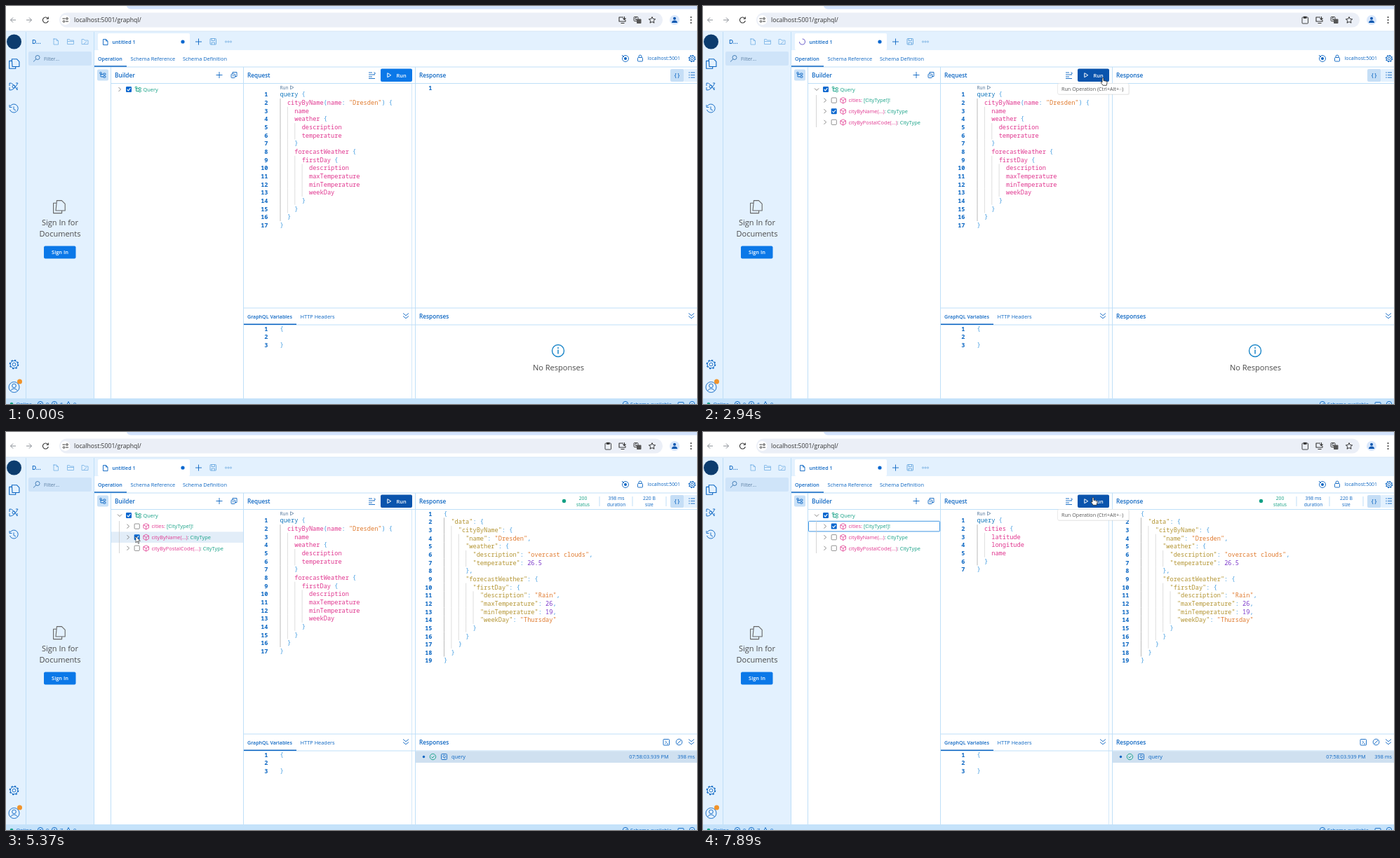
Write an HTML page that moves like this. It is 985x568 px and loops after 8000 ms.

```html
<!DOCTYPE html>
<html lang="en">
<head>
<meta charset="utf-8">
<title>GraphQL editor</title>
<style>
html, body { margin: 0; width: 100%; height: 100%; overflow: hidden; background: #fff }
svg { display: block; font-family: "Open Sans", "Noto Sans", sans-serif }
.mono { font-family: "Noto Sans Mono", "DejaVu Sans Mono", monospace; font-size: 8.65px; font-weight: 500 }
.num { font-weight: 700; fill: #0a66c2 }
</style>
</head>
<body>
<svg width="985" height="568" viewBox="0 0 985 568"><g id="base"></g><g id="live"></g></svg>
<script>
const BLUE = '#0b65c2', RUN = '#0b78e8', DARK = '#0a54ad', PALE = '#e3f1fe', EDGE = '#bfdff8',
  PINK = '#e0368f', GREEN = '#14a085', GREY = '#4a4a4a', LOOP = 8000, LINE = 11.66, CHAR = 5.19;

// Shape helpers; text is placed by its visual middle.
const rect = (x, y, w, h, fill, extra = '') => `<rect x="${x}" y="${y}" width="${w}" height="${h}" fill="${fill}" ${extra}/>`;
const path = (d, stroke = BLUE, width = 0.9, fill = 'none', extra = '') =>
  `<path d="${d}" stroke="${stroke}" stroke-width="${width}" fill="${fill}" stroke-linejoin="round" ${extra}/>`;
const circle = (x, y, r, fill, stroke = 'none', width = 0.9) =>
  `<circle cx="${x}" cy="${y}" r="${r}" fill="${fill}" stroke="${stroke}" stroke-width="${width}"/>`;
const ring = (x, y, r, stroke = BLUE, width = 0.9) => circle(x, y, r, 'none', stroke, width);
const box = (x, y, w, h, stroke = BLUE, r = 1) => rect(x, y, w, h, 'none', `stroke="${stroke}" stroke-width=".9" rx="${r}"`);
const text = (x, y, s, size = 7.4, fill = BLUE, weight = 400, anchor = 'start') =>
  `<text x="${x}" y="${y + size * 0.36}" font-size="${size}" fill="${fill}" font-weight="${weight}" text-anchor="${anchor}">${s}</text>`;
const bold = (x, y, s, size, fill, anchor) => text(x, y, s, size, fill, 600, anchor);
const hline = (x1, x2, y, color = EDGE, w = 1) => path(`M${x1} ${y}H${x2}`, color, w);
const vline = (x, y1, y2, color = EDGE, w = 1) => path(`M${x} ${y1}V${y2}`, color, w);

const files = (x, y, s, color) => path(`M${x - 3 * s} ${y - 7 * s}h7l${4 * s} ${4 * s}v${8 * s}h${-11 * s}z
  M${x - 3 * s} ${y - 4 * s}h${-4 * s}v${12 * s}h${10 * s}v${-3 * s}`, color, 1.1);
const page = (x, y, color = BLUE) => path(`M${x - 3} ${y - 4}h4l2.5 2.5v5.5h-6.5zM${x + 1} ${y - 4}v2.5h2.5`, color);
const gear = (x, y, r) => ring(x, y, r * 0.36) + ring(x, y, r * 0.8) +
  circle(x, y, r * 0.95, 'none', BLUE, 1.3).replace('/>', ` stroke-dasharray="${r * 0.37}"/>`);
const cube = (x, y) => path(`M${x} ${y - 4}l3.8 2v4.2l-3.8 2.2l-3.8-2.2v-4.2zM${x - 3.8} ${y - 2}l3.8 2l3.8-2M${x} ${y}v4.2`, PINK, 0.8);
const branch = (x, y, color) => path(`M${x - 3} ${y - 2}v4.5h3.5M${x - 3} ${y - 1}h3.5`, color) +
  box(x - 4.3, y - 4, 2.6, 2.3, color) + box(x + 0.5, y - 2.5, 3.5, 2.3, color) + box(x + 0.5, y + 1.3, 3.5, 2.3, color);
const fold = (x, y) => path(`M${x - 4} ${y - 4}l4 3.3l4-3.3M${x - 4} ${y}l4 3.3l4-3.3`);
const checkbox = (x, y, on) => on
  ? rect(x - 4, y - 4, 8, 8, '#0867cf', 'rx="1.2"') + path(`M${x - 2.3} ${y}l1.7 1.8l3-3.6`, '#fff', 1.1)
  : rect(x - 3.6, y - 3.6, 7.2, 7.2, '#fff', 'stroke="#777" stroke-width=".8" rx="1"');
const chevron = (x, y, open) => path(open ? `M${x - 3} ${y - 1.5}l3 3l3-3` : `M${x - 1.5} ${y - 3}l3 3l-3 3`, '#777');

// Code listings
const KINDS = ['#b39431', '#e07a2e', '#7a35c9', '#1478bd', PINK, '#3f9be0'];
const highlight = line => line.replace(/("[^"]*")(?=:)|("[^"]*")|(\d[\d.]*)|(\bquery\b)|(\w+)|([{}(),:]+)/g,
  (s, ...groups) => `<tspan fill="${KINDS[groups.slice(0, 6).findIndex(Boolean)]}">${s}</tspan>`);
function code(lines, x, y, numRight, guides = true) {
  return lines.map((line, i) => {
    const indent = line.search(/\S|$/), cy = y + i * LINE;
    let out = `<text class="mono num" x="${numRight}" y="${cy + 3.1}" text-anchor="end">${i + 1}</text>
      <text class="mono" x="${x + indent * CHAR}" y="${cy + 3.1}">${highlight(line.trim())}</text>`;
    if (guides) for (let c = 0; c < indent; c += 2)
      out += vline(x + c * CHAR + 0.5, cy - LINE / 2, cy + LINE / 2, c ? '#d6d6d6' : '#aaa', 0.8);
    return out;
  }).join('');
}
const FULL = `query {
  cityByName(name: "Dresden") {
    name
    weather {
      description
      temperature
    }
    forecastWeather {
      firstDay {
        description
        maxTemperature
        minTemperature
        weekDay
      }
    }
  }
}`.split('\n');
const EMPTY = ['query {', '', '}'];
const CITIES = ['query {', '  cities {', '    latitude', '    longitude', '    name', '  }', '}'];
const RESULT = JSON.stringify({ data: { cityByName: {
  name: 'Dresden',
  weather: { description: 'overcast clouds', temperature: 26.5 },
  forecastWeather: { firstDay: { description: 'Rain', maxTemperature: 26, minTemperature: 19, weekDay: 'Thursday' } }
} } }, null, 2).split('\n');

function browserBar() {
  return rect(0, 0, 985, 36, '#fff') + path('M172 0q1 4 6 4.5H985V0z', 'none', 0, '#d3e3fd') +
    path('M14 20H6.5m3.5-3.5l-3.5 3.5l3.5 3.5M29 20h7.500m-3.500-3.500l3.500 3.500l-3.500 3.500', '#8a8f96', 1) +
    path('M59.500 17.500a4 4 0 1 0 .8 3.500M60.300 15.500v2.700h-2.700', '#333', 1.100) +
    rect(76, 9.5, 860, 21, '#ebeff7', 'rx="10.5"') + circle(84.5, 20, 7, '#fff') +
    path('M80.500 18h4M85 22h4', '#333', 1) + ring(87, 18, 1.3, '#333') + ring(82.5, 22, 1.3, '#333') +
    text(97, 20, 'localhost:5001/graphql/', 8.66, '#333') +
    path('M880 16h-6v6h9v-2M876.500 24.500h5M881.500 15v4.500m-2-2l2 2l2-2', '#333', 1.100) +
    box(895, 15.5, 6, 6, '#333') + rect(899, 18.5, 6.5, 6.5, '#555', 'rx="1"') + text(898, 18.5, 'G', 4.5, '#333', 700, 'middle') +
    path('M921 15.500l1.400 3l3.300.3l-2.500 2.200l.8 3.200l-3-1.700l-3 1.700l.8-3.200l-2.500-2.200l3.300-.3z', '#333', 1) +
    circle(953, 20, 7, '#d9e7fb') + circle(953, 17.8, 2, '#0b57b0') + path('M949 24q0-3.500 4-3.500t4 3.500z', 'none', 0, '#0b57b0') +
    [16, 20, 24].map(y => circle(976.5, y, 1, '#333')).join('');
}
function sidebar() {
  return rect(0, 36, 985, 27, PALE) + rect(0, 36, 126, 524, PALE) + hline(0, 985, 36, '#d5e6f6') +
    vline(28.5, 37, 560) + vline(125.5, 37, 560) +
    circle(11.5, 51, 10.5, '#0c3c6e') + files(11, 82, 0.9, BLUE) +
    ring(11, 115, 2) + path('M5 110q5-1 11 10M5 120q6 1 12-10M5 110v4M5 120v-4M17 110l-3 0M16 120v-4') +
    path('M6 143a6 6 0 1 1-.5 5M5 141v3.500h3.500M11 143.500v4l3 1.500') +
    gear(11.5, 511.5, 6.5) +
    ring(11.5, 544, 7.5) + ring(11.5, 542, 2.8) + path('M6.500 549q5-6 10 0') + circle(19.5, 536, 3.5, '#f0932b') +
    bold(37, 51, 'D...', 8.4) +
    page(71, 51, '#82b8e8') + path('M67 47h3', '#82b8e8') +
    path('M87.500 54.500v-7h3l1 1.500h5v5.500zM87.500 50.500h9M108 54.500v-7h3l1 1.500h5v5.500zM111 54l4-3.500', '#82b8e8') +
    rect(32, 65, 90, 20, '#cfe4f9', 'rx="2"') + ring(45, 73.5, 3, '#3875b0') + path('M43 75.700l-4 3.800', '#3875b0') +
    text(54, 75, 'Filter...', 7, '#5b7fa3') +
    files(76, 286, 1.2, '#666') + text(77, 309.5, 'Sign In for', 11, GREY, 400, 'middle') +
    text(77, 325, 'Documents', 11, GREY, 400, 'middle') +
    rect(54, 342.5, 45.5, 18, RUN, 'rx="2"') + bold(77, 351.5, 'Sign In', 7.4, '#fff', 'middle');
}
function panels() {
  return rect(126, 63, 859, 497, '#fff') + rect(131, 39, 131, 24, '#fff', 'rx="2"') +
    bold(151.5, 51, 'untitled 1', 7.1) + circle(252, 51, 2.6, '#0867cf') +
    path('M270 51h9M274.500 46.500v9') + box(291, 46.5, 8.5, 8.5, '#68a7df') + path('M293 46.500v3h4.500v-3M293 55v-3h4.500v3', '#68a7df') +
    [313.5, 317, 320.5].map(x => ring(x, 51, 1.1, '#68a7df', 0.7)).join('') +
    bold(131, 75, 'Operation', 7.1) + text(177.5, 75, 'Schema Reference', 7.4, BLUE, 500) + text(252, 75, 'Schema Definition', 7.4, BLUE, 500) +
    hline(126, 985, 87) + hline(126, 172, 86, BLUE, 1.4) +
    ring(883, 75, 4.5) + circle(883, 75, 2, BLUE) + path('M878 70l3 3', BLUE, 1) + box(900.5, 73.5, 7, 5.5) + path('M902 73.500v-1.500a2 2 0 0 1 4 0v1.500') +
    text(914.5, 75, 'localhost:5001', 6.9, BLUE, 500) + gear(978, 75, 4.8) +
    vline(149.5, 87, 560) + vline(338.5, 87, 560) + vline(583.5, 87, 560) + hline(150, 985, 110.5) +
    rect(130, 90.5, 16, 16, '#c9e1f8', 'rx="2"') + branch(138, 98.5, BLUE) +
    bold(155, 99, 'Builder', 8.25) + path('M299.500 98.500h9M304 94v9') + box(321, 97, 5.5, 5.5) + path('M323 97v-2.500h6v6h-2.500M322.500 99.700h2.500') +
    bold(344, 99, 'Request', 8.25) + path('M517 95h5M517 98h9M517 101h5M524.500 94.500l2 1.500l-2 1.500M517 103.500h9') +
    bold(589, 99, 'Response', 8.25) +
    rect(947, 90, 19.5, 18, '#c5def6', 'rx="2"') + rect(966.5, 90, 19, 18, PALE) + text(956.5, 98.5, '{ }', 7.4, BLUE, 600, 'middle') +
    [95, 98.5, 102].map(y => circle(974, y, 0.7, BLUE) + hline(976, 982, y, BLUE, 0.9)).join('') +
    vline(578.5, 111, 560, '#d4e8f9') + hline(339, 985, 431) + hline(339, 985, 455) +
    bold(344, 443, 'GraphQL Variables', 7.1) + text(419.5, 443, 'HTTP Headers', 7.4, BLUE, 500) + hline(339, 414, 454.3, BLUE, 1.4) +
    fold(570, 442.5) + fold(977, 442.5) + bold(589, 443.5, 'Responses', 8.25) +
    code(['{', '', '}'], 390.5, 460.5, 373.5) +
    rect(0, 560, 985, 8, '#c5e2fa') + circle(8, 568, 2.3, GREEN) + text(14.5, 568.5, 'Online', 7.3) +
    ring(49, 568, 3.7) + path('M47.500 566.500l3 3m0-3l-3 3') + text(59, 568.5, '0', 7.3, BLUE, 400, 'middle') +
    ring(69, 568, 3.7) + path('M69 566v4') + path('M89 564.500l-3.500 7h7z') + text(98, 568.5, '0', 7.3, BLUE, 400, 'middle') +
    ring(883, 568, 3.7) + path('M881 568l1.500 1.500l2.500-3') + text(890, 568.5, 'Schema available', 7.3) +
    box(958, 565.5, 8, 6) + ring(978, 568, 3.7) + text(978, 568.5, '?', 6, BLUE, 400, 'middle');
}
base.innerHTML = browserBar() + sidebar() + panels();

// Timeline, in milliseconds
const EXPAND = 1350, SEND = 2600, ANSWER = 3070, CLEAR = 5430, CHECK = 5930, INSERT = 6750, VALID = 7170;
const within = (t, ranges) => ranges.some(([a, b]) => t >= a && t < b);
const ROUTE = [[120, 904, 552], [900, 322, 95], [930, 318, 96], [1290, 161, 117], [1400, 161, 117], [1640, 214, 163],
  [1680, 228, 148], [1740, 229, 148], [2340, 626, 112], [2520, 570, 102], [3540, 570, 102], [3900, 766, 328],
  [4260, 234, 208], [4350, 234, 206], [4590, 181, 141], [5130, 185, 149], [5550, 185, 149], [5880, 185, 137],
  [6180, 185, 137], [6400, 186, 133], [7100, 186, 133], [7700, 556, 93], [LOOP, 556, 93]];
function pointerAt(t) {
  const i = Math.max(1, ROUTE.findIndex(stop => stop[0] > t));
  const [t0, x0, y0] = ROUTE[i - 1], [t1, x1, y1] = ROUTE[i];
  const u = Math.max(0, (t - t0) / (t1 - t0)), e = u * u * (3 - 2 * u);
  return [x0 + (x1 - x0) * e, y0 + (y1 - y0) * e];
}
function pointer(x, y) {
  const at = `transform="translate(${x} ${y})"`;
  const overBox = x > 182 && x < 191;
  if ((x > 150 && x < 338 && y > 111 && y < 174 && !overBox) || (x > 534 && x < 579 && y > 90 && y < 108))
    return path('M-1 6V1q1-1.500 2 0v3.500l4 .8q1.300.5 1 2l-.8 4h-5l-3-4q0-1.600 1.800-.3z', '#222', 0.8, '#fff', at);
  if (y > 111 && y < 430 && x > 339)
    return path('M-2-5q2 0 2 1q0-1 2-1M0-4v8M-2 5q2 0 2-1q0 1 2 1', '#333', 0.8, 'none', at);
  return path('M0 0v9l2.100-2l1.500 3.300l1.300-.6l-1.500-3.200h2.900z', '#333', 0.7, '#fff', at);
}

function tree(t) {
  const open = t >= EXPAND, [hx, hy] = pointerAt(t - 30), rowY = i => 119 + i * 15.6;
  const hovered = t > 150 && hx > 150 && hx < 338 ? Math.round((hy - 119) / 15.6) : -1;
  const selected = within(t, [[EXPAND, SEND]]) ? 0 : within(t, [[CLEAR, CHECK]]) ? 2 : t >= CHECK ? 1 : -1;
  const last = open ? 3 : 0;
  let out = '';
  if (hovered >= 0 && hovered <= last) out += rect(150, rowY(hovered) - 7.8, 188, 15.6, '#e2edf8');
  if (selected >= 0) out += box(150.5, rowY(selected) - 7.3, 187, 14.6, '#2b8be0');
  out += chevron(162, 119, open) + checkbox(175, 119, true) + branch(188.5, 119, GREEN) + text(195.5, 119.3, 'Query', 7.4, GREEN);
  if (!open) return out;
  const fields = [['cities: ', '[CityType!]!', t >= CHECK], ['cityByName(...)', ': CityType', t < CLEAR], ['cityByPostalCode(...)', ': CityType', false]];
  return out + vline(161.5, 127, 173, '#ccc', 0.8) + fields.map(([name, type, on], i) => {
    const y = rowY(i + 1);
    return chevron(174, y) + checkbox(186.7, y, on) + cube(199.7, y) +
      text(207.5, y + 0.2, `${name}<tspan fill="${GREEN}">${type}</tspan>`, 7.4, PINK);
  }).join('');
}
function request(t) {
  const lines = t < CLEAR ? FULL : t < INSERT ? EMPTY : CITIES;
  const lens = !within(t, [[CLEAR, CHECK - 60], [INSERT, VALID]]), top = lens ? 126.3 : 116.5;
  let out = code(lines, 390.5, top, 373.5, lens);
  if (lens) out += text(390.5, 116.3, 'Run', 6.6, '#4b7197') + path('M405.500 113.800v5l4.500-2.500z', '#4b7197', 0.7);

  const height = 320 * 320 / (320 + (lines.length - 1) * LINE + (lens ? 10 : 0));
  const opacity = Math.max(0, ...[[540, 820], [2030, 2450], [4000, 4230], [CLEAR, 7690]].map(([a, b]) =>
    t < a ? 0 : Math.min(1, Math.max(0, 1 - (t - b) / 200))));
  if (opacity) out += rect(578.5, 111, 5, height, '#a6c8e9', `opacity="${opacity}"`);

  if (t >= CLEAR && t < VALID) {
    const y = top + (t < INSERT ? 2 : 1) * LINE, x = t < INSERT ? 390.5 : 397.5;
    out += ring(344.5, y, 3.3, '#e0526c') + path(`M343.300 ${y - 1.2}l2.400 2.400m0-2.400l-2.400 2.400`, '#e0526c', 0.8) +
      path(`M${x} ${y + 5}l1.300-1.400l1.300 1.400l1.300-1.400l1.300 1.400`, '#d83a3a', 0.8) + rect(580.5, y - 8.5, 3, 10, '#c43d6b');
  }
  const dark = within(t, [[2440, CLEAR], [7610, LOOP]]);
  return out + rect(534, 89.5, 45, 18.5, dark ? DARK : RUN, 'rx="2"') +
    path('M543.800 95.700v6l5-3z', '#fff', 1) + bold(556.5, 99, 'Run', 7.4, '#fff');
}
function response(t) {
  const count = text(79, 568.5, t < ANSWER ? 6 : 7, 7.3, BLUE, 400, 'middle');
  if (t < ANSWER) return count + code([''], 624, 116.5, 607.5) + ring(787, 492, 8.5, '#1b86c8', 1.4) +
    path('M787 490.500v6', '#1b86c8', 1.5) + circle(787, 488, 1, '#1b86c8') + text(787.5, 516, 'No Responses', 11.05, GREY, 400, 'middle');
  const stat = (x, value, label, color) => text(x, 94.8, value, 6.8, color, 500, 'middle') + text(x, 104, label, 6.7, color, 400, 'middle');
  return count + code(RESULT, 624, 116.5, 607.5) + circle(795.5, 98.5, 2.7, GREEN) +
    stat(822.5, '200', 'status', GREEN) + stat(870, '398 ms', 'duration', BLUE) + stat(917, '220 B', 'size', BLUE) +
    [846, 893, 941].map(x => vline(x, 92, 106)).join('') +
    box(937, 438.5, 8.5, 8.5) + path('M939.500 440.800l2.200 2l-2.200 2M942 445h2') + ring(959.5, 442.5, 4.3) + path('M956.500 445.500l6-6') +
    rect(584, 455.5, 401, 16.500, '#cfe0f0') + circle(595.5, 463.5, 1.7, BLUE) +
    ring(608.5, 463.5, 4.2, GREEN) + path('M606.500 463.500l1.500 1.600l2.700-3', GREEN) +
    box(620.5, 459.5, 8, 8) + text(624.5, 463.3, 'Q', 6, BLUE, 600, 'middle') + text(635, 463.7, 'query') +
    text(944.5, 463.7, '07:58:03.939 PM', 7.3, BLUE, 400, 'end') + text(982, 463.7, '398 ms', 7.3, BLUE, 400, 'end');
}
function draw(t) {
  let out = tree(t) + request(t) + response(t);
  out += within(t, [[SEND + 30, ANSWER]])
    ? path('M141.500 47a4 4 0 1 1-4 4', '#7a6fd0', 1.1, 'none', `transform="rotate(${(t - 2940) * 0.36} 141.5 51)"`)
    : page(141.5, 51.5);
  if (t >= EXPAND) out += box(854, 16, 8.5, 9, '#333') + rect(856, 14.8, 4.5, 3, '#333');
  if (within(t, [[2620, 3570], [7760, LOOP]]))
    out += rect(506, 111.5, 102, 15.5, '#0001', 'rx="2"') + rect(505.5, 110.5, 101.5, 15.5, '#fff', 'rx="2" stroke="#e2e2e2" stroke-width=".7"') +
      text(511, 118.3, 'Run Operation (Ctrl+Alt+<tspan fill="#bbb" font-size="5">⏎</tspan>)', 7.2, '#555');
  if (t >= 120) out += pointer(...pointerAt(t));
  live.innerHTML = out;
}
const start = performance.now();
function tick() {
  draw((performance.now() - start) % LOOP);
  requestAnimationFrame(tick);
}
tick();
</script>
</body>
</html>
```
